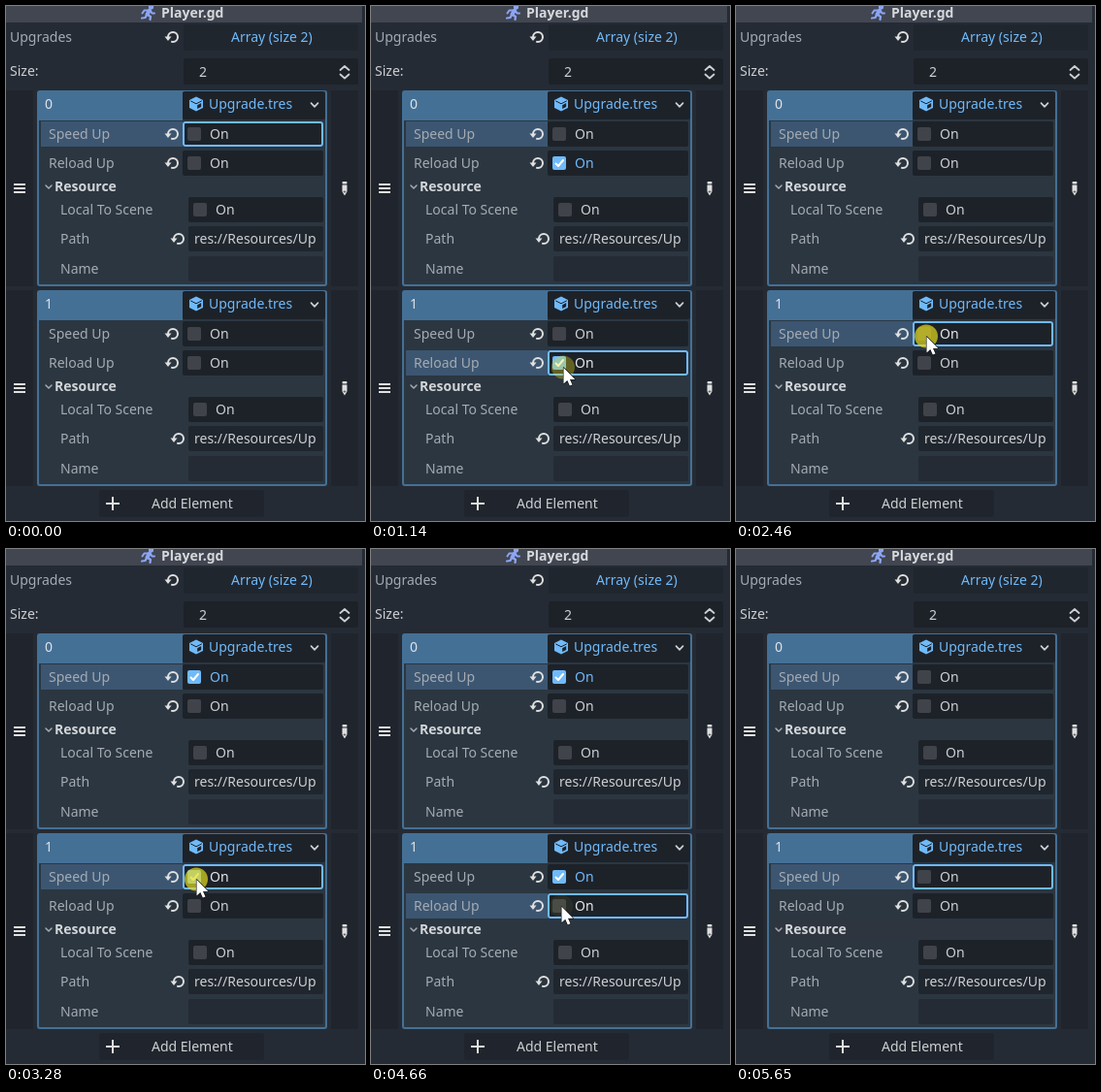
An HTML page with a canvas that plays this animation: 370x531 px, repeating every 5.99 s.

```html
<!DOCTYPE html>
<html lang="en">
<head>
<meta charset="utf-8">
<title>Inspector</title>
<style>
html, body { margin: 0; width: 100%; height: 100%; overflow: hidden; background: #252b34; }
canvas { display: block; width: 370px; height: 531px; }
</style>
</head>
<body>
<canvas id="stage" width="370" height="531"></canvas>
<script>
const ctx = document.getElementById('stage').getContext('2d');
const LOOP = 5990;
const ITEM_STEP = 206;
const PANEL = '#252b34', FIELD = '#1d2229', INNER = '#2b3640', FRAME = '#457095';
const BLUE = '#70bafa', TEXT = '#cdcfd2', LABEL = '#a5abb2', ICON = '#e0e0e0';

// Time, x and y of the pointer tip
const path = [
  [320, 258, 527], [730, 213, 386], [880, 199, 377], [980, 199, 377],
  [1080, 198, 373], [2040, 198, 373], [2360, 196, 341], [3870, 196, 341],
  [4180, 196, 369], [4650, 196, 369], [4870, 196, 341], [5230, 196, 341],
  [5470, 205, 403], [5560, 205, 403], [5650, 258, 512]
];
const presses = [980, 1830, 2460, 3280, 3650, 4230, 4460, 4890];
const toggles = { speed: [2560, 3390, 3750, 4990], reload: [1080, 1930, 4330, 4560] };
const focusChanges = [[0, 0, 'speed'], [980, 1, 'reload'], [2460, 1, 'speed'],
  [4230, 1, 'reload'], [4890, 1, 'speed']];

const isOn = (name, t) => toggles[name].filter(at => at <= t).length % 2 === 1;

function pointerAt(t) {
  if (t < path[0][0] || t >= path[path.length - 1][0]) return null;
  const i = path.findIndex(p => p[0] > t) - 1;
  const [t0, x0, y0] = path[i], [t1, x1, y1] = path[i + 1];
  const u = (t - t0) / (t1 - t0);
  const smooth = u * u * (3 - 2 * u);
  const ux = i === 0 ? u : smooth;
  const uy = i === 0 ? 1 - (1 - u) ** 2 : smooth;
  return { x: x0 + (x1 - x0) * ux, y: y0 + (y1 - y0) * uy };
}

function box(x, y, w, h, color, r = 0) {
  ctx.fillStyle = color;
  ctx.beginPath();
  ctx.roundRect(x, y, w, h, r);
  ctx.fill();
}

function frame(x, y, w, h, color, width) {
  ctx.strokeStyle = color;
  ctx.lineWidth = width;
  ctx.beginPath();
  ctx.roundRect(x + width / 2, y + width / 2, w - width, h - width, 2);
  ctx.stroke();
}

function text(str, x, y, color = TEXT, weight = 400) {
  ctx.font = `${weight} 14px "Noto Sans", sans-serif`;
  ctx.fillStyle = color;
  ctx.fillText(str, x, y);
}

function line(points, color, width) {
  ctx.strokeStyle = color;
  ctx.lineWidth = width;
  ctx.lineCap = ctx.lineJoin = 'round';
  ctx.beginPath();
  points.forEach(([x, y]) => ctx.lineTo(x, y));
  ctx.stroke();
}

function shape(points, color) {
  ctx.fillStyle = color;
  ctx.beginPath();
  points.forEach(([x, y]) => ctx.lineTo(x, y));
  ctx.closePath();
  ctx.fill();
}

const chevron = (x, y, w, h, color, width) =>
  line([[x - w, y - h], [x, y + h], [x + w, y - h]], color, width);

function revertIcon(x, y) {
  ctx.strokeStyle = ICON;
  ctx.lineWidth = 2;
  ctx.lineCap = 'butt';
  ctx.beginPath();
  ctx.arc(x + 1, y, 5, Math.PI, Math.PI * 2.62);
  ctx.stroke();
  shape([[x - 7.5, y - 0.5], [x - 0.5, y - 0.5], [x - 4, y + 4]], ICON);
}

function cubeIcon(x, y) {
  shape([[x, y - 7.5], [x + 7, y - 4], [x + 7, y + 4], [x, y + 7.5], [x - 7, y + 4], [x - 7, y - 4]], BLUE);
  shape([[x + 1.2, y + 1.2], [x + 5.2, y - 1], [x + 5.2, y + 3], [x + 1.2, y + 5]], FIELD);
  line([[x - 5.5, y - 3], [x, y - 0.2], [x + 5.5, y - 3]], FIELD, 1);
}

function runnerIcon() {
  const c = '#8da5f3';
  ctx.fillStyle = c;
  ctx.beginPath();
  ctx.arc(149.5, 1, 2.6, 0, 7);
  ctx.fill();
  line([[148, 4.5], [145.5, 8.5]], c, 4);
  line([[147, 4.5], [142.5, 4.5], [140.5, 7.5]], c, 2);
  line([[149, 5], [150.5, 7.5], [153, 7.5]], c, 2);
  line([[146, 9], [149, 11], [148.5, 14]], c, 2.2);
  line([[145, 9], [143.5, 12], [140, 12.5]], c, 2.2);
}

function pencilIcon(x, y) {
  box(x - 2.5, y - 7, 5, 2.5, ICON, 1);
  box(x - 2.5, y - 3.5, 5, 7, ICON);
  shape([[x - 2.5, y + 3.5], [x + 2.5, y + 3.5], [x, y + 7.5]], ICON);
  box(x - 0.5, y + 2.5, 1, 2, FIELD);
}

function checkField(x, y, on, hover) {
  box(x, y - 13, 327 - x, 26, FIELD, 2);
  box(x + 5, y - 7, 14, 14, on ? BLUE : '#404349', 2);
  if (on) line([[x + 8.5, y + 0.5], [x + 11, y + 3], [x + 16, y - 3]], '#fff', 2);
  text('On', x + 28, y + 5, hover ? '#e6e7e9' : on ? BLUE : TEXT);
}

function propertyRow(index, name, label, y, state) {
  const focused = state.focus[1] === index && state.focus[2] === name;
  if (focused || (index === 0 && name === 'speed')) box(36, y - 13, 146, 26, '#3c5671');
  text(label, 44, y + 5, LABEL);
  revertIcon(171, y);
  const p = state.pointer;
  const hover = p && p.x > 182 && p.x < 327 && Math.abs(p.y - y) < 13;
  checkField(182, y, isOn(name, state.t), hover);
  if (focused) frame(182, y - 13, 145, 26, BLUE, 2);
}

function item(index, state) {
  ctx.save();
  ctx.translate(0, index * ITEM_STEP);
  box(0, 87, 28, 202, '#20252d');
  box(335, 87, 28, 202, '#20252d');
  [183, 187, 191].forEach(y => box(8, y, 12, 2, ICON));
  pencilIcon(349, 188);

  box(32, 87, 299, 202, INNER, 2);
  frame(32, 87, 299, 202, FRAME, 2);
  box(33, 88, 149, 30, FRAME);
  text(String(index), 40, 106, '#dfe3e8');
  box(182, 88, 147, 29, FIELD, 2);
  cubeIcon(196, 101);
  text('Upgrade.tres', 209, 106, BLUE);
  chevron(318, 102, 3.5, 1.8, TEXT, 1.7);
  ctx.restore();

  const top = index * ITEM_STEP;
  propertyRow(index, 'speed', 'Speed Up', 132 + top, state);
  propertyRow(index, 'reload', 'Reload Up', 162 + top, state);

  ctx.save();
  ctx.translate(0, top);
  if (index === 1 && state.t >= 5570) box(40, 177, 287, 19, '#2e353f');
  chevron(44, 186.5, 3, 1.5, LABEL, 1.5);
  text('Resource', 50, 191, '#d2d5d8', 700);
  text('Local To Scene', 56, 215, LABEL);
  checkField(188, 210, false, false);
  text('Path', 56, 245, LABEL);
  revertIcon(177, 240);
  box(188, 227, 139, 26, '#20262e', 2);
  text('res://Resources/Up', 194, 245);
  text('Name', 56, 276, LABEL);
  box(188, 258, 139, 26, '#252b34', 2);
  ctx.restore();
}

function pointer(p, t) {
  const age = t - Math.max(...presses.filter(at => at <= t), -1000);
  if (age < 210) {
    ctx.globalAlpha = age < 110 ? 1 : (210 - age) / 100;
    ctx.fillStyle = 'rgba(228,218,30,.7)';
    ctx.beginPath();
    ctx.arc(p.x, p.y - 0.5, 12, 0, 7);
    ctx.fill();
    ctx.globalAlpha = 1;
  }
  const arrow = [[0, 0], [0, 16.5], [3.8, 13], [6.3, 18.6], [9, 17.4], [6.5, 12], [11.8, 12]]
    .map(([x, y]) => [p.x + x + 0.5, p.y + y]);
  line([...arrow, arrow[0]], '#111', 1.2);
  shape(arrow, '#fff');
}

function draw(t) {
  const state = {
    t,
    pointer: pointerAt(t),
    focus: focusChanges.filter(f => f[0] <= t).pop()
  };
  box(0, 0, 370, 531, PANEL);
  box(0, 0, 367, 17, '#414651');
  runnerIcon();
  text('Player.gd', 160, 12, '#d6d8db', 700);

  text('Upgrades', 4, 37, LABEL);
  revertIcon(171, 32);
  box(183, 19, 180, 27, '#20262e', 2);
  text('Array (size 2)', 232, 37, BLUE);
  text('Size:', 4, 72);
  box(183, 54, 180, 27, FIELD, 2);
  text('2', 199, 73);
  chevron(349, 64, 4.5, -2, TEXT, 1.8);
  chevron(349, 72.5, 4.5, 2, TEXT, 1.8);

  item(0, state);
  item(1, state);

  box(96, 499, 170, 28, '#20252d', 2);
  box(103, 512, 14, 2, ICON);
  box(109, 506, 2, 14, ICON);
  text('Add Element', 150, 518);
  if (state.pointer) pointer(state.pointer, t);
}

const start = performance.now();
function tick() {
  draw((performance.now() - start) % LOOP);
  requestAnimationFrame(tick);
}
tick();
</script>
</body>
</html>
```
